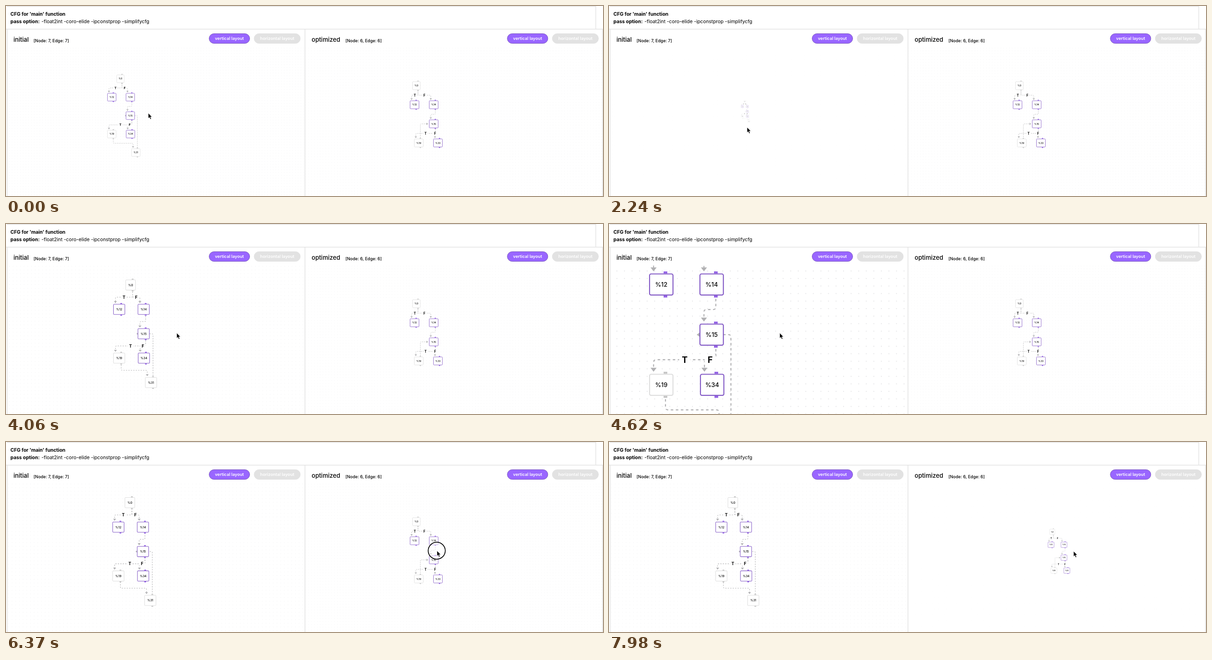
An HTML page that plays this animation: 1280 by 409 pixels, repeating every 8000 ms.

```html
<!DOCTYPE html>
<html lang="en">
<head>
<meta charset="utf-8">
<title>CFG viewer</title>
<style>
  html, body { margin: 0; height: 100%; overflow: hidden; background: #fff; }
  svg { display: block; width: 100vw; height: 100vh; font-family: Inter, sans-serif; }
  .head { font-size: 10.4px; }
  .title { font-size: 13px; font-weight: 500; }
  .count { font-size: 9px; font-weight: 500; }
  .button { font-size: 9.1px; font-weight: 600; fill: #fff; text-anchor: middle; }
  .node { font-size: 12px; font-weight: 500; text-anchor: middle; }
  .branch { font-size: 17px; font-weight: 700; text-anchor: middle; }
  .edge { fill: none; stroke: #b1b1b3; stroke-width: 2; stroke-dasharray: 5; }
  .arrow { fill: #b1b1b3; }
</style>
</head>
<body>
<svg id="stage" viewBox="0 0 1280 409"></svg>
<script>
const stage = document.getElementById('stage');
const LOOP = 8000, ROW = 100, PURPLE = '#845bc6', GREY = '#dedede';
const OUT = 8.3, IN = -15.3, PORT = 26; // handle offsets from a node's centre

// A node sits in a column and row relative to %15; purple ones are highlighted.
function node(label, column, row, active) {
  const width = 35.5 + 6.5 * String(label).length;
  return { label, width, active, x: column * ROW - 24.2 + width / 2, y: row * ROW };
}

// The part both graphs share; the last edge of a graph runs back up into %15.
function makeGraph(rootColumn, loopColumn, exit, extraNodes, extraEdges) {
  const nodes = [
    node(0, rootColumn, -2), node(12, -1, -1, true), node(14, 0, -1, true),
    node(15, 0, 0, true), node(19, loopColumn, 1), exit, ...extraNodes
  ];
  const edges = [[0, 12, 'T'], [0, 14, 'F'], [14, 15], [15, 19, 'T'], [15, exit.label, 'F'], ...extraEdges];
  return { nodes, edges, find: label => nodes.find(n => n.label === label) };
}
const initial = makeGraph(-.5, -1, node(34, .01, 1, true), [node(31, .3, 2)], [[19, 31], [31, 15]]);
const optimized = makeGraph(-.87, -.78, node(33, .22, 1, true), [], [[19, 15]]);

// Pointer gestures in order of time; a drag pans a view, a zoom keeps the pointer's spot fixed.
const move = (start, end, x, y) => ({ start, end, x, y });
const drag = (view, start, end, x, y) => ({ view, start, end, x, y });
const zoom = (view, start, end, k) => ({ view, start, end, k });
const gestures = [
  move(150, 250, 307.4, 223.7), zoom('initial', 250, 1350, .106),
  move(1400, 1750, 296, 261), move(2250, 2320, 296.2, 239.2), zoom('initial', 2320, 2500, .434),
  move(2600, 3200, 345, 258), drag('initial', 3400, 3600, 353, 282), drag('initial', 3600, 3750, 355, 304.8),
  move(3750, 3920, 366, 234.5), zoom('initial', 3920, 4400, 1.08),
  move(4700, 4850, 363.3, 233.6), zoom('initial', 4880, 5180, .526), move(5180, 5240, 365, 234),
  move(5280, 5800, 1078, 230), move(5950, 6280, 924, 234),
  drag('optimized', 6310, 6650, 924, 234), drag('optimized', 6650, 6900, 944, 325),
  drag('optimized', 6900, 7150, 982, 197), drag('optimized', 7150, 7420, 972.7, 236),
  move(7420, 7540, 996, 235), zoom('optimized', 7560, 7980, .278)
];

function replay(time) {
  const state = {
    pointer: { x: 305, y: 230.5 }, pressed: false,
    initial: { x: 266.5, y: 236, k: .397 }, optimized: { x: 917, y: 253.7, k: .411 }
  };
  const { pointer } = state;
  for (const g of gestures) {
    if (time < g.start) break;
    const u = Math.min(1, (time - g.start) / (g.end - g.start)), eased = u * u * (3 - 2 * u);
    const view = state[g.view];
    if (g.k) {
      const ratio = (g.k / view.k) ** eased;
      view.x = pointer.x + (view.x - pointer.x) * ratio;
      view.y = pointer.y + (view.y - pointer.y) * ratio;
      view.k *= ratio;
    } else {
      const dx = (g.x - pointer.x) * eased, dy = (g.y - pointer.y) * eased;
      for (const p of view ? [pointer, view] : [pointer]) { p.x += dx; p.y += dy; }
      state.pressed = Boolean(view) && u < 1;
    }
  }
  return state;
}

const text = (x, y, cls, str, extra = '') => `<text x="${x}" y="${y}" class="${cls}" ${extra}>${str}</text>`;
const line = d => `<path d="${d}" fill="none" stroke="#e4e4e4" stroke-width="1.5"/>`;
const arrow = (x, y, turn) =>
  `<path class="arrow" d="M-6-8H6L0 0Z" transform="translate(${x} ${y}) rotate(${turn})"/>`;

// Orthogonal path with rounded corners
function route(points) {
  const toward = ([x, y], [u, v]) => {
    const length = Math.hypot(u - x, v - y), r = Math.min(5, length / 2) / length;
    return [x + (u - x) * r, y + (v - y) * r];
  };
  const d = points.map((p, i) => {
    if (!i) return `M${p}`;
    if (i === points.length - 1) return `L${p}`;
    return `L${toward(p, points[i - 1])}Q${p} ${toward(p, points[i + 1])}`;
  });
  return `<path class="edge" d="${d.join('')}"/>`;
}

function drawEdge(from, to, label) {
  const x1 = from.x + OUT;
  if (from.y > to.y) {
    const side = to.x - 29.6;
    return route([[x1, from.y - PORT], [x1, to.y], [side, to.y]]) + arrow(side, to.y, x1 < side ? -90 : 90);
  }
  const y1 = from.y + PORT, x2 = to.x + IN, y2 = to.y - PORT;
  const x = (x1 + x2) / 2, y = (y1 + y2) / 2;
  return route([[x1, y1], [x1, y], [x2, y], [x2, y2 - 2]]) + arrow(x2, y2, 0) + (label
    ? `<rect x="${x - 11}" y="${y - 10}" width="22" height="20" rx="2" fill="#fff"/>` +
      text(x, y + 6, 'branch', label) : '');
}

function drawNode({ label, x, y, width, active }) {
  const handle = top =>
    `<rect x="${x + OUT - 3.7}" y="${top}" width="7.4" height="4" fill="${active ? '#9463e6' : '#c6c6c6'}"/>`;
  return handle(y - 26) + handle(y + 22) +
    `<rect x="${x - width / 2 + 1}" y="${y - 21}" width="${width - 2}" height="42" rx="3"
      fill="#fff" stroke="${active ? PURPLE : GREY}" stroke-width="2"/>` +
    text(x, y + 4.4, 'node', '%' + label);
}

function drawGraph({ nodes, edges, find }) {
  return edges.map(([from, to, label]) => drawEdge(find(from), find(to), label)).join('') +
    nodes.map(drawNode).join('');
}

function drawPanel(id, left, graph, countX) {
  const button = (x, w, label, fill, stroke) =>
    `<rect x="${left + x}" y="59.5" width="${w}" height="21" rx="10.5" fill="${fill}" stroke="${stroke}"/>` +
    text(left + x + w / 2, 73.4, 'button', label);
  const area = `M${left + 3} 87h637v322h-637z`;
  const counts = `[Node: ${graph.nodes.length}, Edge: ${graph.edges.length}]`;
  return `
    <pattern id="${id}Dots" width="15" height="15" patternUnits="userSpaceOnUse">
      <circle cx="7" cy="8" r=".55" fill="#9a9aa2"/></pattern>
    <clipPath id="${id}Clip"><path d="${area}"/></clipPath>
    <g clip-path="url(#${id}Clip)">
      <path d="${area}" fill="url(#${id}Dots)"/>
      <g id="${id}">${drawGraph(graph)}</g>
    </g>` +
    text(left + 16, 77.4, 'title', id) + text(left + countX, 77.6, 'count', counts) +
    button(435.5, 87, 'vertical layout', '#9966ff', '#7d5cc0') +
    button(532, 99, 'horizontal layout', '#e2e2e2', '#e2e2e2');
}

stage.innerHTML =
  text(9.5, 21, 'head', "CFG for 'main' function", 'font-weight="700"') +
  text(9.5, 37, 'head', 'pass option:', 'font-weight="700"') +
  text(76, 37, 'head', '-float2int -coro-elide -ipconstprop -simplifycfg') +
  drawPanel('initial', 0, initial, 59) +
  drawPanel('optimized', 639.3, optimized, 88.4) +
  line('M2 .8H1264.5V49M0 49.7H1280M2.5 50V409M641 50V409M1279 50V409') +
  `<g id="cursor">
    <circle id="press" r="18.3" cx="-.5" fill="#fff" fill-opacity=".4" stroke="#000" stroke-width="1.7"/>
    <path d="M0 0V11.6L2.6 9.2L4.4 13.5L6.5 12.6L4.7 8.4H8.2Z" stroke="#fff" stroke-width=".8"/>
  </g>`;

const byId = id => document.getElementById(id);
const edges = document.querySelectorAll('.edge');

function render(now) {
  const time = now % LOOP, state = replay(time);
  for (const id of ['initial', 'optimized']) {
    const { x, y, k } = state[id], transform = `translate(${x} ${y}) scale(${k})`;
    byId(id).setAttribute('transform', transform);
    byId(id + 'Dots').setAttribute('patternTransform', transform);
  }
  edges.forEach(e => { e.style.strokeDashoffset = 10 - time % 500 / 50; });
  byId('cursor').setAttribute('transform', `translate(${state.pointer.x} ${state.pointer.y})`);
  byId('press').style.display = state.pressed ? '' : 'none';
}

const start = performance.now();
function tick() {
  render(performance.now() - start);
  requestAnimationFrame(tick);
}
tick();
</script>
</body>
</html>
```
